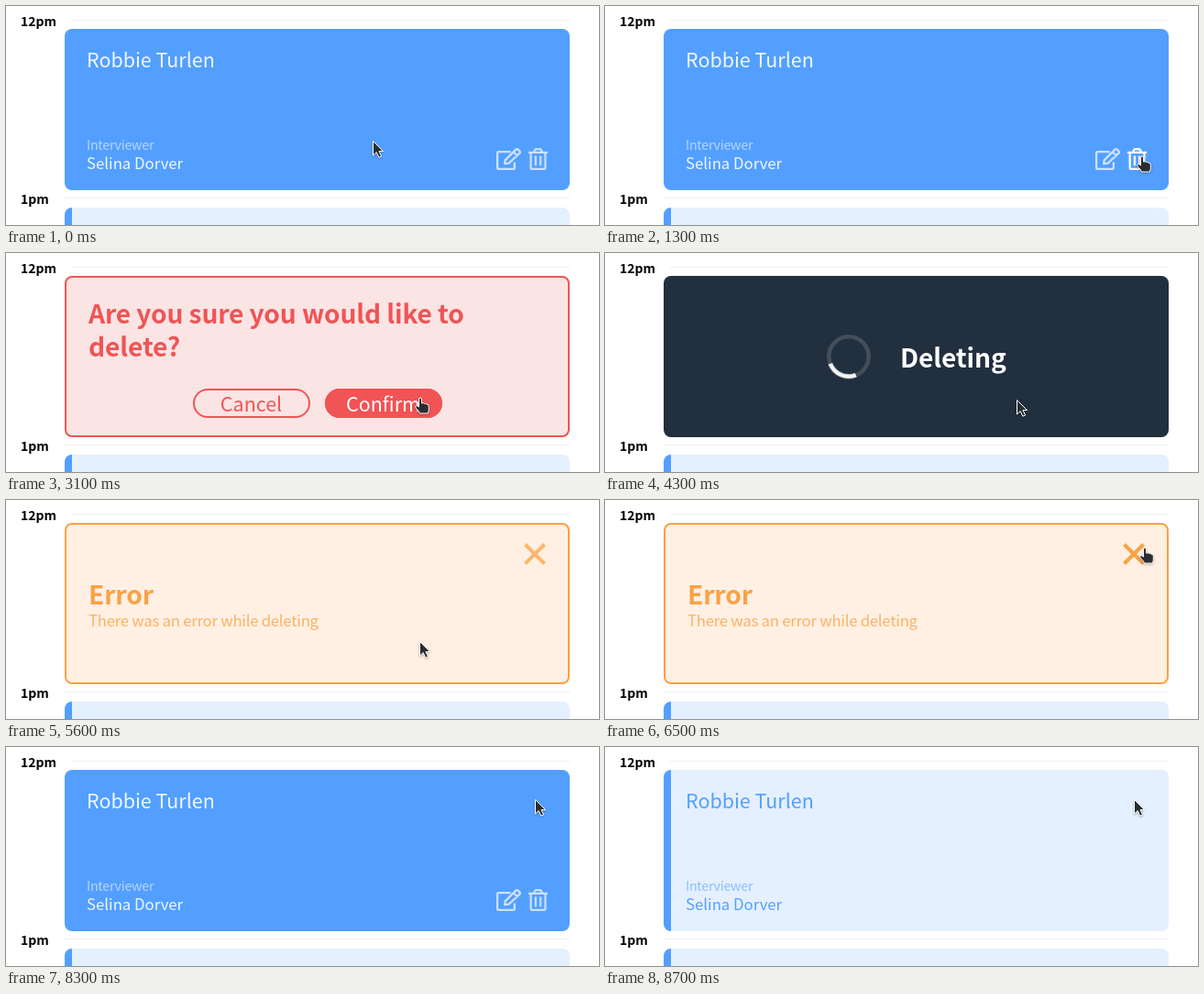
Write an HTML page that moves like this. It is 647x239 px and loops after 8800 ms.

```html
<!DOCTYPE html>
<html lang="en">
<head>
<meta charset="utf-8">
<title>Appointment card</title>
<style>
  html, body { margin: 0; width: 100%; height: 100%; overflow: hidden; background: #fff; }
  svg { display: block; }
  text {
    font-family: "Noto Sans CJK JP", "Noto Sans CJK SC", "Noto Sans CJK KR", "Noto Sans CJK TC", "Noto Sans", sans-serif;
    font-weight: 400;
    white-space: pre;
  }
  .hour { font-size: 14px; font-weight: 700; fill: #000; }
  .name { font-size: 21.48px; }
  .role { font-size: 14.32px; font-weight: 300; letter-spacing: -.02em; }
  .host { font-size: 16.75px; }
  .title { font-size: 28.2px; font-weight: 700; letter-spacing: -.005em; }
  .note { font-size: 16.75px; font-weight: 300; letter-spacing: -.015em; }
  .label { font-size: 21.48px; text-anchor: middle; }
  .icon { fill: none; stroke: #fff; stroke-width: 48; stroke-linejoin: round; }
  .scene { opacity: 0; }
</style>
</head>
<body>
<svg width="647" height="239" viewBox="0 0 647 239">
  <defs>
    <path id="bar" d="M72 0a8 8 0 0 0-8 8v160a8 8 0 0 0 8 8z" fill="#539fff"/>
    <g id="slot">
      <rect x="64" width="551" height="176" rx="8" fill="#e4f0ff"/>
      <use href="#bar"/>
    </g>
    <g id="details">
      <text class="name" x="88" y="67">Robbie Turlen</text>
      <text class="role" x="88" y="157" opacity=".62">Interviewer</text>
      <text class="host" x="88" y="178">Selina Dorver</text>
    </g>
  </defs>

  <text class="hour" x="16" y="22">12pm</text>
  <text class="hour" x="16" y="216">1pm</text>
  <path d="M71 15.5H615M63 209.5H615" stroke="#f0f0f0"/>
  <use href="#slot" y="220"/>

  <g class="scene" id="plain">
    <use href="#slot" y="25"/>
    <use href="#details" fill="#539fff"/>
  </g>

  <g class="scene" id="hovered">
    <rect x="64" y="25" width="551" height="176" rx="8" fill="#539fff"/>
    <use href="#details" fill="#fff" opacity=".92"/>
    <g class="icon" id="edit" transform="translate(535 155) scale(.0469)">
      <path d="M335 88H48Q24 88 24 112V464Q24 488 48 488H400Q424 488 424 464V330"/>
      <path d="M195 365L205 285L455 35Q480 13 505 35L541 71Q563 96 541 121L290 355ZM400 90L486 176"/>
    </g>
    <g class="icon" id="trash" transform="translate(570 155) scale(.0469)">
      <path d="M0 104H448M56 104V464Q56 488 80 488H368Q392 488 392 464V104"/>
      <path d="M126 96L156 40Q164 24 180 24H268Q284 24 292 40L322 96M168 180V412M280 180V412"/>
    </g>
  </g>

  <g class="scene" id="confirm">
    <rect x="65" y="26" width="549" height="174" rx="7" fill="#fbe4e4" stroke="#f05455" stroke-width="2"/>
    <g fill="#f05455">
      <text class="title" x="90" y="77">Are you sure you would like to</text>
      <text class="title" x="90" y="113">delete?</text>
      <text class="label" x="267.5" y="173">Cancel</text>
      <text class="label" x="411.5" y="173">Confirm</text>
    </g>
    <g fill="none" stroke="#f05455" stroke-width="2">
      <rect x="205" y="149" width="126" height="30" rx="15"/>
      <rect x="349" y="149" width="126" height="30" rx="15"/>
    </g>
    <g id="pressed">
      <rect x="348" y="148" width="128" height="32" rx="16" fill="#f05455"/>
      <text class="label" x="411.5" y="173" fill="#fff">Confirm</text>
    </g>
  </g>

  <g class="scene" id="deleting">
    <rect x="64" y="25" width="551" height="176" rx="8" fill="#222f3e"/>
    <g transform="translate(266 113)" fill="none" stroke-width="4.6">
      <circle r="21.7" stroke="#424e58"/>
      <path id="arc" d="M21.7 0A21.7 21.7 0 0 1 0 21.7" stroke="#f4f5f6"/>
    </g>
    <text class="title" x="322" y="125" fill="#fff">Deleting</text>
  </g>

  <g class="scene" id="error">
    <rect x="65" y="26" width="549" height="174" rx="7" fill="#fff0e3" stroke="#faa144" stroke-width="2"/>
    <g fill="#faa144">
      <text class="title" x="90" y="114">Error</text>
      <text class="note" x="90" y="138" opacity=".78">There was an error while deleting</text>
    </g>
    <path id="close" d="M566.5 48.5L587.5 69.5M587.5 48.5L566.5 69.5" stroke="#faa144" stroke-width="4"/>
  </g>

  <g id="cursor" stroke="#fff" stroke-linejoin="round" style="filter: drop-shadow(0 1px 1px rgba(0,0,0,.3))">
    <path id="arrow" d="M.5 .5V16L4.2 12.6L6.8 18.2L9.6 17L7 11.6H11.6Z" fill="#2b2d30"/>
    <path id="hand" fill="#2b2d30" d="M1.5 8V0Q1.5-2 3-2T4.6 0V4Q6.3 3 7.3 4.4Q9 3.6 9.9 5.1Q12.3 4.6 12.3 7.2V11Q12.3 13 11.3 15H2.6Q1.5 12.5-.5 10.6L-2.1 8.8Q-2.6 7.4-1.5 6.7Q-.2 6.3 1.5 8Z"/>
  </g>
</svg>

<script>
const LOOP = 8800;
const find = id => document.getElementById(id);

// Plays [time, value] steps in a loop, each value held until the next.
function hold(id, prop, steps) {
  const frames = steps.map(([time, value]) => ({ offset: time / LOOP, [prop]: value, easing: 'steps(1, end)' }));
  frames.push({ offset: 1, [prop]: steps.at(-1)[1] });
  find(id).animate(frames, { duration: LOOP, iterations: Infinity });
}

// Switches opacity between off and on at each listed time, starting with off at 0.
function toggle(id, times, off = 0, on = 1) {
  hold(id, 'opacity', [[0, off], ...times.map((time, i) => [time, i % 2 ? off : on])]);
}

// One point per 100 ms.
const run = (start, points) => points.map(([x, y], i) => [start + i * 100, x, y]);

const path = [
  [0, 400, 147], [100, 411, 147],
  ...run(500, [[422, 149], [448, 155], [482, 163], [515, 171], [543, 174], [563, 175], [575, 171], [581, 168], [583, 166]]),
  [2000, 581, 166],
  ...run(2300, [[577, 166], [563, 166], [540, 165], [512, 164], [486, 163], [468, 162], [457, 161], [451, 160], [449, 160]]),
  ...run(5600, [[451, 154], [464, 143], [485, 127], [512, 107], [540, 87], [562, 71], [577, 61], [584, 56], [586, 54]]),
  ...run(7300, [[584, 54], [582, 55]]),
  ...run(7900, [[580, 55], [578, 56]]),
  ...run(8200, [[577, 56], [577, 57]])
];
hold('cursor', 'transform', path.map(([time, x, y]) => [time, `translate(${x}px, ${y}px)`]));

const pointing = [900, 1000, 1100, 2000, 2800, 3400, 6200, 7200];
toggle('hand', pointing);
toggle('arrow', pointing, 1, 0);

toggle('hovered', [2000, 7200, 8700], 1, 0);
toggle('confirm', [2000, 3400]);
toggle('deleting', [3400, 4400]);
toggle('error', [4400, 7200]);
toggle('plain', [8700]);

toggle('edit', [900, 1000], .7);
toggle('trash', [1100, 2000], .7);
toggle('pressed', [2800, 3400]);
toggle('close', [6200, 7200], .72);

// The arc turns once per second and stands at 69 degrees at 4300 ms.
const turns = Array.from({ length: 10 }, (_, i) => 3400 + i * 100);
hold('arc', 'transform', [[0, 'rotate(0deg)'], ...turns.map(time => [time, `rotate(${69 + (time - 4300) * .36}deg)`])]);
</script>
</body>
</html>
```
